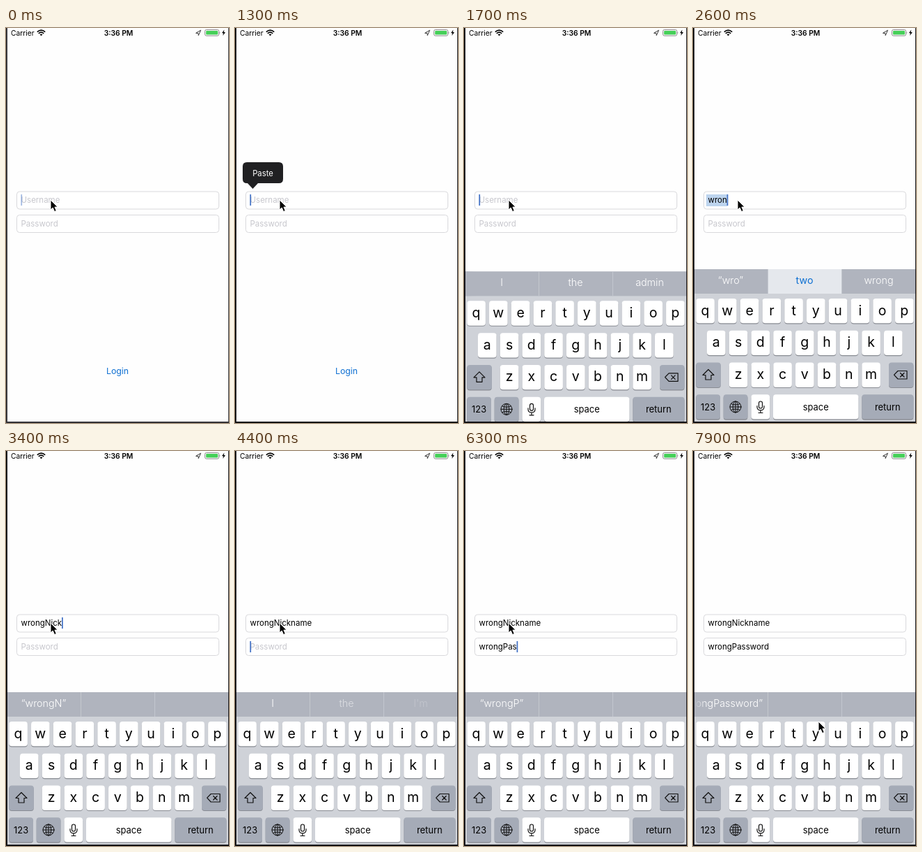
An HTML page for the animation above (8 s loop, 320 by 565 pixels).

```html
<!DOCTYPE html>
<html lang="en">
<head>
<meta charset="utf-8">
<title>Login form</title>
<style>
  html, body { margin: 0; height: 100%; overflow: hidden; background: #fefefe; }
  svg { display: block; width: 320px; height: 565px; font-family: Inter, Roboto, sans-serif; }
  .mid { text-anchor: middle; }
  .field { fill: #fff; stroke: #d9d9dc; }
  .input { font-size: 11.5px; }
  .status { font-size: 10.3px; }
  .letter { font-size: 19.5px; }
  .label { font-size: 12.9px; }
  .word { font-size: 14.3px; font-weight: 300; fill: #fff; }
  .icon { fill: none; stroke: #111; stroke-width: 1.2; stroke-linejoin: round; stroke-linecap: round; }
</style>
</head>
<body>
<svg viewBox="0 0 320 565">
  <defs>
    <linearGradient id="fade">
      <stop stop-color="#b0b4be"/>
      <stop offset="1" stop-color="#b0b4be" stop-opacity="0"/>
    </linearGradient>
    <clipPath id="cell"><path d="M2 345H107V380H2Z"/></clipPath>
  </defs>
  <rect width="320" height="565" fill="#fefefe"/>

  <g class="status">
    <text x="7" y="10.5">Carrier</text>
    <text x="161.5" y="10.5" class="mid" font-weight="600">3:36 PM</text>
    <g fill="none" stroke="#000" stroke-width="1.7">
      <path d="M44.8 5.6Q50.5 .8 56.2 5.6M46.8 7.8Q50.5 4.6 54.2 7.8"/>
      <path d="M48.5 9.2Q50.5 7.6 52.5 9.2L50.5 11.3Z" fill="#000" stroke="none"/>
    </g>
    <path d="M272.5 7.3L279.5 3.2L276.2 10.6L275.8 7.5Z" fill="none" stroke="#222" stroke-width=".9"/>
    <rect x="285.5" y="2.5" width="20" height="8.6" rx="2" fill="none" stroke="#888"/>
    <rect x="287" y="4" width="17" height="5.6" rx=".8" fill="#45cf58"/>
    <path d="M306.6 5.2Q308.4 6.8 306.6 8.4Z" fill="#888"/>
    <path d="M313.3 2.5L309.8 7.3H311.9L311.2 11L314.8 6H312.6Z"/>
  </g>

  <rect class="field" x="15.5" y="234" width="290" height="25" rx="4"/>
  <rect class="field" x="15.5" y="267.5" width="290" height="25" rx="4"/>
  <rect id="mark" x="19" height="17" fill="#bdd4ee"/>
  <text id="user" class="input" x="21.5" y="250"></text>
  <text id="pass" class="input" x="21.5" y="284"></text>
  <rect id="caret" width="1.7" height="16" fill="#3f6fc4"/>
  <text x="160" y="495" class="mid" font-size="12.3" fill="#0f70d2">Login</text>

  <g id="paste">
    <path d="M17 192H63Q69 192 69 198V216Q69 222 63 222H33L25.5 230L18 222H17Q11 222 11 216V198Q11 192 17 192Z" fill="#202022"/>
    <text x="40" y="211.5" class="mid" font-size="11.3" fill="#fff">Paste</text>
  </g>

  <g id="keyboard">
    <rect y="345" width="320" height="220" fill="#cfd2d8"/>
    <rect y="345" width="320" height="35" fill="#b0b4be"/>
    <rect id="pick" x="107" y="345" width="107" height="35" fill="#e5e8ed"/>
    <path d="M107.5 345V380M213.5 345V380" stroke="#c3c7ce"/>
    <g id="words">
      <g clip-path="url(#cell)"><text class="word" y="366"></text></g>
      <text class="word mid" x="160" y="366"></text>
      <text class="word mid" x="266.5" y="366"></text>
    </g>
    <rect x="2" y="345" width="16" height="35" fill="url(#fade)"/>
    <g id="keys"></g>
    <g class="icon">
      <path d="M22 488.5L30 496.5H26V503H18V496.5H14Z"/>
      <path d="M294 490.5H307V502H294L288.5 496.2ZM297.5 493.5L303 499M303 493.5L297.5 499"/>
      <g stroke-width="1">
        <circle cx="61" cy="542" r="8"/>
        <ellipse cx="61" cy="542" rx="3.8" ry="8"/>
        <path d="M53 542H69M61 534V550M54.6 537.5Q61 540.5 67.4 537.5M54.6 546.5Q61 543.5 67.4 546.5"/>
      </g>
      <rect x="94.5" y="534" width="5" height="10" rx="2.5"/>
      <path d="M92 540.5V542Q92 546.8 97 546.8T102 542V540.5M97 547V550.5M94 550.5H100"/>
    </g>
  </g>

  <path id="frame" d="M0 0H2V563H319V0H320V565H0Z"/>
  <path id="pointer" d="M0 0V14L3.2 11.1L5.6 16.6L8.3 15.4L5.9 10.1H10.2Z" stroke="#fff" stroke-width="1" stroke-linejoin="round"/>
</svg>

<script>
const LOOP = 8000;
const $ = id => document.getElementById(id);
const clamp = v => Math.min(1, Math.max(0, v));
const ramp = (t, from, to) => clamp((t - from) / (to - from));

function key(x, y, w, label = '', fill = '#fff', style = 'label') {
  const base = style === 'letter' ? y + 23.5 : y + 22.5;
  $('keys').innerHTML += `
    <rect x="${x}" y="${y + 1}" width="${w}" height="35.5" rx="4" fill="#898c93"/>
    <rect x="${x}" y="${y}" width="${w}" height="35.3" rx="4" fill="${fill}"/>
    <text class="mid ${style}" x="${x + w / 2}" y="${base}">${label}</text>`;
}

['qwertyuiop', 'asdfghjkl', 'zxcvbnm'].forEach((row, r) =>
  [...row].forEach((c, i) =>
    key([4.3, 20, 51.8][r] + i * 31.75, 387 + r * 45.8, 26.6, c, '#fff', 'letter')));
const GREY = '#a5abb7';
key(4.3, 478.6, 35.5, '', GREY);
key(281, 478.6, 35.3, '', GREY);
key(4.3, 524.3, 34.7, '123', GREY);
key(43.7, 524.3, 34.7, '', GREY);
key(83.5, 524.3, 26.6);
key(115, 524.3, 122.5, 'space');
key(242.3, 524.3, 74, 'return', GREY);

const TAB = 4200;
const fields = [
  { el: $('user'), hint: 'Username', text: 'wrongNickname', y: 238,
    times: [2000, 2200, 2400, 2500, 2700, 3000, 3200, 3300, 3400, 3500, 3700, 3800, 3900] },
  { el: $('pass'), hint: 'Password', text: 'wrongPassword', y: 272,
    times: [4800, 5000, 5200, 5500, 5600, 5900, 6100, 6200, 6400, 6500, 6700, 7000, 7200] }
];

// Start time, then the three suggestions
const suggestions = [
  [0, 'I', 'the', 'admin'],
  [2100, '“w”', 'we', 'was'],
  [2300, '“wr”', 'we', 'wrong'],
  [2500, '“wro”', 'two', 'wrong'],
  [2800, '“wrong”', 'wrongs', 'wrongly'],
  [3100, '“wrongN”', '', ''],
  [4300, 'I', 'the', "I'm"],
  [4900, '“w”', 'we', 'was'],
  [5100, '“wr”', 'we', 'wrong'],
  [5400, '“wro”', 'two', 'wrong'],
  [5700, '“wrong”', 'wrongs', 'wrongly'],
  [6000, '“wrongP”', '', ''],
  [7400, '“wrongPassword”', '', '']
];
const words = document.querySelectorAll('#words text');

function drawFields(t) {
  const active = t < TAB ? 0 : 1;
  fields.forEach(({ el, hint, text, times, y }, i) => {
    const typed = text.slice(0, times.filter(at => at <= t).length);
    el.textContent = typed || hint;
    el.setAttribute('fill', typed ? '#000' : '#c7c7cd');
    if (i !== active) return;
    const width = typed ? el.getComputedTextLength() : 0;
    $('caret').setAttribute('x', 21.4 + width);
    $('caret').setAttribute('y', y);
    $('mark').setAttribute('y', y);
    $('mark').setAttribute('width', typed === 'wron' ? width + 3 : 0);
  });
  const glow = .5 * (1 - ramp(t, 0, 100)) + ramp(t, 300, 600) - ramp(t, 7400, 7700);
  $('caret').setAttribute('opacity', glow);
}

function drawSuggestions(t) {
  const [start, ...list] = suggestions.filter(s => s[0] <= t).pop();
  list.forEach((word, i) => {
    words[i].textContent = word;
    const fresh = start === 4300 ? ramp(t, 4230 + i * 60, 4400 + i * 90) : 1;
    words[i].setAttribute('opacity', fresh);
  });
  const width = words[0].getComputedTextLength();
  words[0].setAttribute('x', Math.min(54 - width / 2, 100 - width));
  const picked = list[1] === 'two';
  $('pick').setAttribute('opacity', picked ? 1 : 0);
  words[1].style.fill = picked ? '#0f70d2' : '#fff';
  words[1].style.fontWeight = picked ? 400 : 300;
}

function draw(now) {
  const t = now % LOOP;
  drawFields(t);
  drawSuggestions(t);
  $('frame').setAttribute('fill', t < 800 ? '#343337' : '#131215');
  $('paste').setAttribute('opacity', ramp(t, 950, 1150) - ramp(t, 1350, 1600));
  const drop = 220 * (1 - ramp(t, 1400, 1800)) ** 3;
  $('keyboard').setAttribute('transform', `translate(0 ${drop})`);
  const p = ramp(t, 7350, 7900), move = p * p * (3 - 2 * p);
  $('pointer').setAttribute('transform', `translate(${64 + 116 * move} ${246 + 141 * move})`);
  requestAnimationFrame(draw);
}
requestAnimationFrame(draw);
</script>
</body>
</html>
```
